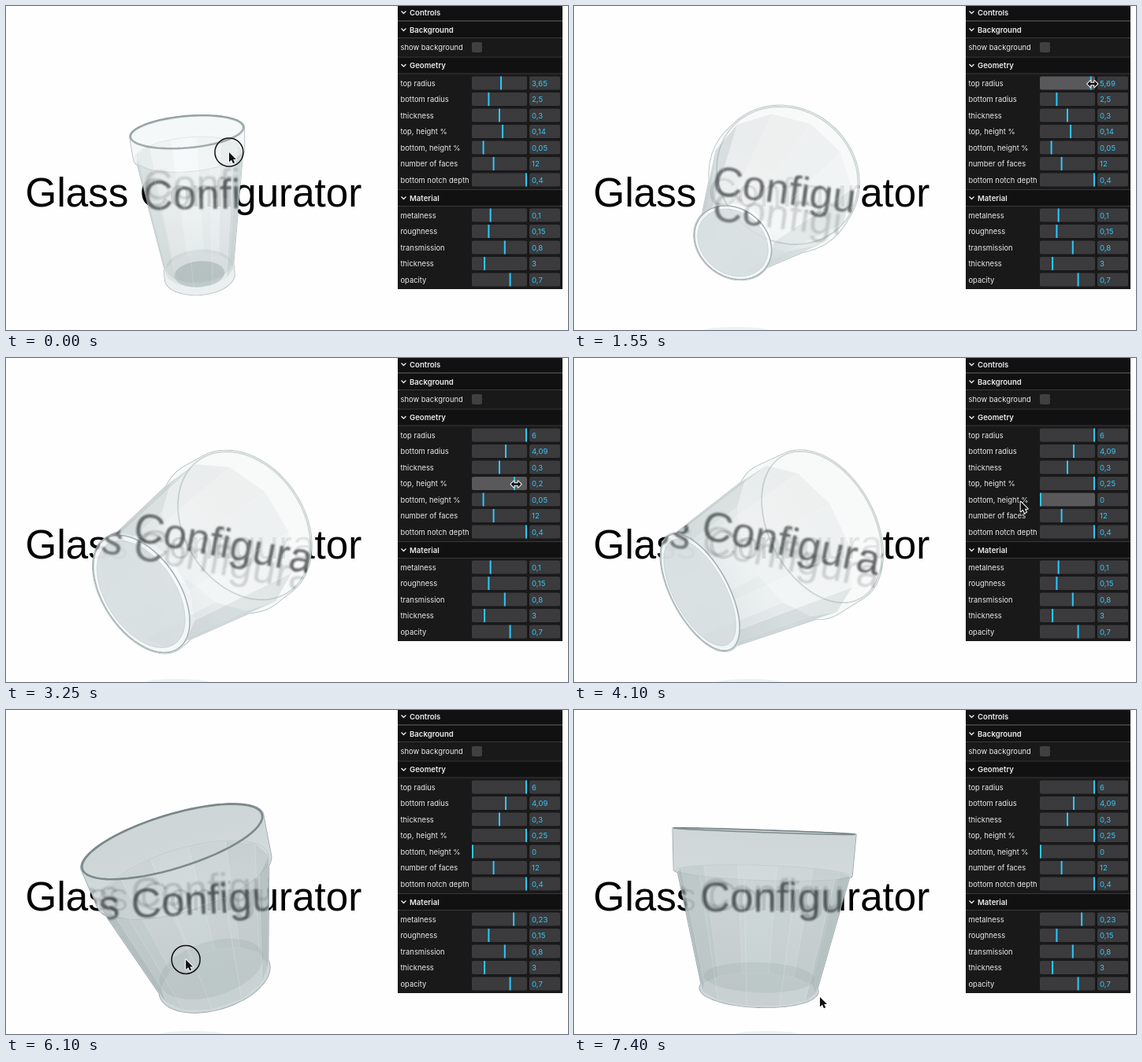
Write an HTML page with a canvas that moves like this. It is 713 by 412 pixels and loops after 7450 ms.

```html
<!DOCTYPE html>
<html lang="en">
<head>
<meta charset="utf-8">
<title>Glass Configurator</title>
<style>
html, body { margin: 0; width: 100%; height: 100%; overflow: hidden; background: #fefefe; }
canvas { display: block; }
</style>
</head>
<body>
<canvas id="stage" width="713" height="412"></canvas>
<script>
const ctx = document.getElementById('stage').getContext('2d');
const LOOP = 7450, STEP = 50, TAU = Math.PI * 2, DEG = TAU / 360;
const TITLE = 'Glass Configurator', FACES = 12;
const CENTER = [238, 256], HEIGHT = 202, UNIT = 18.7, CAMERA = 700;

// Slider rows: label, value, minimum, maximum
const geometry = [
  ['top radius', 3.65, 1, 6],
  ['bottom radius', 2.5, 1, 6],
  ['thickness', 0.3, 0.1, 0.5],
  ['top, height %', 0.14, 0, 0.25],
  ['bottom, height %', 0.05, 0, 0.25],
  ['number of faces', 12, 3, 26],
  ['bottom notch depth', 0.4, 0, 0.4]
];
const material = [
  ['metalness', 0.1, 0, 0.3],
  ['roughness', 0.15, 0, 0.5],
  ['transmission', 0.8, 0.5, 1],
  ['thickness', 3, 1, 10],
  ['opacity', 0.7, 0, 1]
];
const makeRows = (list, y) => list.map(([label, value, min, max], i) =>
  ({ label, value, min, max, y: y + i * 20.5 }));
const rows = [...makeRows(geometry, 98), ...makeRows(material, 266)];
const [TOP, BOTTOM, , TOP_H, BOTTOM_H, , , METAL] = rows;
const barX = (row, v) => 591 + 68 * (v - row.min) / (row.max - row.min);

// What the pointer does: drags a slider or turns the glass
const slide = (row, from, to, value) => ({
  row, from, to, value,
  start: [barX(row, row.value) + 3, row.y + 1],
  end: [barX(row, value) + 3, row.y + 1]
});
const orbit = (from, to, start, end) => ({ from, to, start, end });
const acts = [
  orbit(0, 500, [283, 186], [215, 27]),
  slide(TOP, 800, 1665, 6),
  slide(BOTTOM, 1850, 2400, 4.09),
  slide(TOP_H, 2900, 3600, 0.25),
  slide(BOTTOM_H, 3800, 4090, 0),
  orbit(4300, 4800, [300, 200], [245, 330]),
  slide(METAL, 5200, 5700, 0.23),
  orbit(6050, 7100, [224, 315], [312, 365])
];
// Time, roll and elevation of the glass in degrees
const poses = [
  [0, -5, 24], [500, 39, -59], [1550, 39, -59], [2400, 51, -50],
  [4300, 63, -31], [4800, -18, 24], [6050, -18, 25], [7100, 2, 9]
];

const clamp = k => Math.min(1, Math.max(0, k));
const mix = (a, b, k) => a + (b - a) * k;
const mixAll = (a, b, k) => a.map((v, i) => mix(v, b[i], k));
const progress = (t, act) => clamp((t - act.from) / (act.to - act.from));

function poseAt(t) {
  const i = poses.findIndex(p => p[0] > t);
  if (i < 0) return poses[poses.length - 1].slice(1);
  const a = poses[i - 1], b = poses[i];
  return mixAll(a, b, (t - a[0]) / (b[0] - a[0])).slice(1);
}

function valueAt(t, row) {
  const act = acts.find(a => a.row === row);
  return act ? mix(row.value, act.value, progress(t, act)) : row.value;
}

function cursorAt(t) {
  const i = acts.findLastIndex(a => a.from <= t), act = acts[i], next = acts[i + 1];
  if (t <= act.to || !next) return mixAll(act.start, act.end, progress(t, act));
  const k = (t - act.to) / (next.from - act.to);
  return mixAll(act.end, next.start, 1 - (1 - k) ** 2);
}

function text(s, x, y, font, color) {
  ctx.font = font;
  ctx.fillStyle = color;
  ctx.fillText(s, x, y);
}
const sans = size => `${size}px "Liberation Sans", Arial, sans-serif`;
const ui = (weight, size) => `${weight} ${size}px Inter, sans-serif`;
const drawTitle = color => text(TITLE, 24.6, 255.3, sans(51.2), color);

function fill(path, color) {
  ctx.fillStyle = color;
  ctx.fill(path);
}
function stroke(path, color, width) {
  ctx.strokeStyle = color;
  ctx.lineWidth = width;
  ctx.stroke(path);
}
function clipped(path, paint) {
  ctx.save();
  ctx.clip(path);
  paint();
  ctx.restore();
}

// A closed path that always winds the same way, so that joined parts never cancel out
function polygon(pts) {
  const area = pts.reduce((sum, p, i) => {
    const q = pts[(i + 1) % pts.length];
    return sum + p[0] * q[1] - q[0] * p[1];
  }, 0);
  const path = new Path2D();
  (area < 0 ? pts.reverse() : pts).forEach(p => path.lineTo(...p));
  path.closePath();
  return path;
}

// The lettering bent by the glass, starting with the C at x, y
function lens(x, y, angle, color) {
  ctx.save();
  ctx.filter = 'blur(1.3px)';
  ctx.translate(x, y);
  ctx.rotate(angle);
  ctx.font = sans(53);
  text(TITLE, -ctx.measureText('Glass ').width, 0, sans(53), color);
  ctx.restore();
}

function drawGlass(t) {
  const [roll, elevation] = poseAt(t).map(v => v * DEG);
  const [top, bottom, topH, bottomH, metalness] =
    [TOP, BOTTOM, TOP_H, BOTTOM_H, METAL].map(row => valueAt(t, row));
  const metal = (metalness - 0.1) / 0.13, above = elevation > 0;
  const sinE = Math.sin(elevation), cosE = Math.cos(elevation);
  const sinR = Math.sin(roll), cosR = Math.cos(roll);
  const tint = a => `rgba(112,132,134,${a})`;

  // f runs along the axis from the rim (0) to the foot (1)
  const point = (f, r, th) => {
    const h = HEIGHT * (0.5 - f), side = r * UNIT * Math.cos(th), near = r * UNIT * Math.sin(th);
    const scale = 1 / (1 - (h * sinE + near * cosE) / CAMERA);
    const x = side * scale, y = (near * sinE - h * cosE) * scale;
    return [CENTER[0] + x * cosR - y * sinR, CENTER[1] + x * sinR + y * cosR];
  };
  const ring = (f, r) =>
    polygon(Array.from({ length: 72 }, (_, i) => point(f, r, i * TAU / 72)));
  const quad = (f1, r1, f2, r2, a, b) =>
    polygon([point(f1, r1, a), point(f1, r1, b), point(f2, r2, b), point(f2, r2, a)]);

  const foot = 1 - bottomH, neck = top * 0.96, facets = [], whole = new Path2D();
  for (let i = 0; i < 48; i++) {
    const a = i * TAU / 48, b = a + TAU / 48;
    whole.addPath(quad(0, top, topH, top * 0.985, a, b));
    if (bottomH > 0.005) whole.addPath(quad(foot, bottom, 1, bottom, a, b));
  }
  for (let i = 0; i < FACES; i++) {
    const a = (i + 0.35) * TAU / FACES, mid = a + TAU / FACES / 2;
    const path = quad(topH, neck, foot, bottom * 0.97, a, a + TAU / FACES);
    const tone = 0.2 * Math.cos(mid) ** 4 + 0.08 * Math.abs(Math.sin(i * 2.3 + 0.5));
    facets.push({ path, tone, near: Math.sin(mid) > 0 });
    whole.addPath(path);
  }
  whole.addPath(ring(0, top));
  whole.addPath(ring(1, bottom));

  const paintFacets = near => facets.filter(q => q.near === near).forEach(({ path, tone }) => {
    fill(path, tint(tone * (near ? 1 : 0.6)));
    stroke(path, 'rgba(255,255,255,.14)', 0.8);
  });

  ctx.lineJoin = 'round';
  stroke(whole, tint(0.5 + 0.2 * metal), 1.8);
  fill(whole, '#fcfefe');
  clipped(whole, () => {
    drawTitle('rgba(0,0,0,.13)');
    const shade = ctx.createLinearGradient(...point(0, 0, 0), ...point(1, 0, 0));
    shade.addColorStop(0, tint(0.05 + 0.28 * metal));
    shade.addColorStop(0.5, tint(0.02 + 0.25 * metal));
    shade.addColorStop(1, tint(0.12 + 0.2 * metal));
    ctx.fillStyle = shade;
    ctx.fillRect(0, 0, 497, 412);

    paintFacets(false);
    if (above) {
      stroke(ring(topH, neck), tint(0.16), 1);
      fill(ring(0.92, bottom * 0.93), tint(0.13));
      fill(ring(0.985, bottom * 0.72), tint(bottomH * 6));
    } else {
      fill(ring(0, top), 'rgba(255,255,255,.3)');
      stroke(ring(0, top * 0.985), tint(0.3), 1.8);
    }

    const x = 174 - 9 * (bottom - 2.5), y = 257 - 0.45 * roll / DEG;
    const angle = roll * 0.19, shift = -0.55 * elevation / DEG;
    lens(x, y + shift, angle, 'rgba(55,60,60,.2)');
    lens(x, y, angle, 'rgba(30,35,35,.66)');
    paintFacets(true);

    if (!above) {
      const base = ring(1, bottom);
      fill(base, 'rgba(248,251,251,.75)');
      clipped(base, () => lens(x, y + shift, angle, 'rgba(30,35,35,.6)'));
      fill(ring(1, bottom * 0.9), tint(0.2));
      stroke(ring(1, bottom * 0.9), tint(0.2), 1);
      stroke(ring(1, bottom * 0.985), tint(0.6), 1.6);
    }
  });
  if (above) stroke(ring(0, top * 0.988), `rgba(95,112,114,${0.25 + 0.08 * top})`, 0.8 + 4.5 * sinE);
}

function drawPanel(t) {
  ctx.fillStyle = '#1a191a';
  ctx.fillRect(497, 0, 209, 360);
  const heading = (label, y) => {
    ctx.fillStyle = '#111';
    ctx.fillRect(497, y - 11, 209, 21);
    ctx.fillStyle = '#3b3a3b';
    ctx.fillRect(497, y - 11, 209, 1);
    ctx.fillRect(497, y + 10, 209, 1);
    stroke(new Path2D(`M501.5 ${y - 1.5}l3 3l3-3`), '#ebebeb', 1.3);
    text(label, 512, y + 3.5, ui(600, 9.6), '#ebebeb');
  };
  heading('Controls', 8);
  heading('Background', 30);
  heading('Geometry', 75.5);
  heading('Material', 244);

  const box = (x, y, w, h, color) => {
    const path = new Path2D();
    path.roundRect(x, y, w, h, 2);
    fill(path, color);
  };
  text('show background', 500.5, 56, ui(400, 9.4), '#ebebeb');
  box(591, 46, 13, 13, '#403f41');

  for (const row of rows) {
    const { label, y } = row, value = valueAt(t, row);
    const active = acts.some(a => a.row === row && t >= a.from && t <= a.to + 60);
    text(label, 500.5, y + 3.5, ui(400, 9.4), '#ebebeb');
    box(591, y - 8.5, 70, 17, active ? '#59585a' : '#3b3a3c');
    box(664, y - 8.5, 39, 17, '#3b3a3c');
    ctx.fillStyle = '#2cc9ff';
    ctx.fillRect(barX(row, value), y - 8.5, 2, 17);
    text(String(+value.toFixed(2)).replace('.', ','), 667, y + 3.5, ui(400, 9.6), '#2cc9ff');
  }
}

function drawCursor(t) {
  const [x, y] = cursorAt(t);
  ctx.save();
  ctx.translate(x, y);
  ctx.lineJoin = 'round';
  if (acts.some(a => !a.row && t >= a.from - 50 && t <= a.to)) {
    const halo = new Path2D();
    halo.arc(0, 0, 18, 0, TAU);
    stroke(halo, '#111', 1.5);
  }
  const overTrack = x >= 588 && y > 88;
  const shape = new Path2D(overTrack
    ? 'M-6.5 0L-2.5-4V-1.3H2.5V-4L6.5 0L2.5 4V1.3H-2.5V4Z'
    : 'M0 0V12.5L3 9.8L5 14.2L7.2 13.2L5.2 9H9Z');
  stroke(shape, '#fff', 2);
  fill(shape, '#111');
  ctx.restore();
}

function draw(now) {
  const t = Math.floor(now % LOOP / STEP) * STEP;
  ctx.fillStyle = '#fefefe';
  ctx.fillRect(0, 0, 713, 412);
  drawTitle('#000');
  if (t >= 1500) {
    const glow = new Path2D();
    glow.ellipse(mix(195, 245, t / LOOP), 414, 44, 6, 0, 0, TAU);
    fill(glow, '#f0f1f1');
  }
  drawGlass(t);
  drawPanel(t);
  drawCursor(t);
  requestAnimationFrame(draw);
}
requestAnimationFrame(draw);
</script>
</body>
</html>
```
